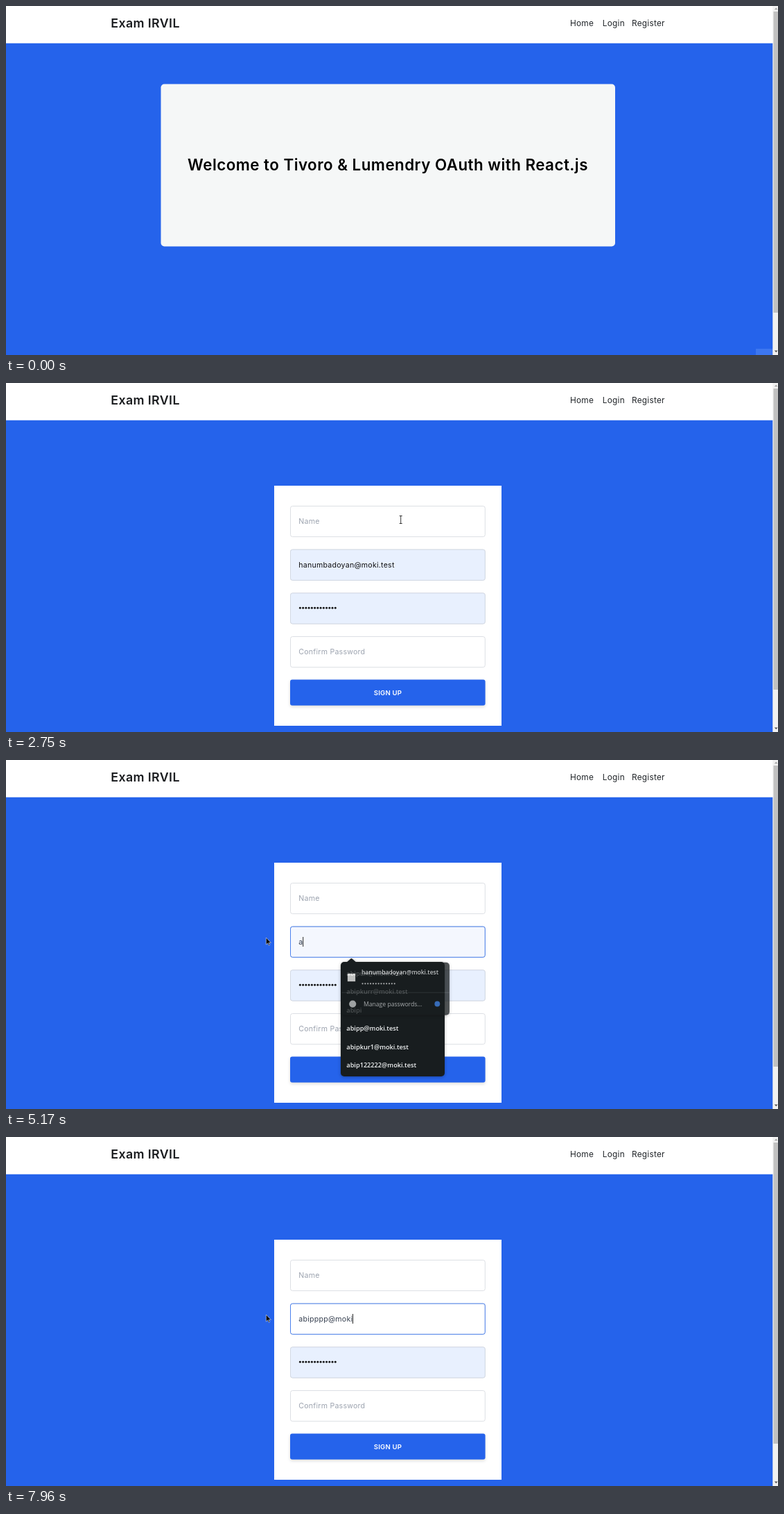
An HTML page for the animation above (8 s loop, 1114 by 503 pixels).

```html
<!DOCTYPE html>
<html lang="en">
<head>
<meta charset="utf-8">
<title>Sign up form</title>
<style>
html, body { margin: 0; width: 100%; height: 100%; overflow: hidden; }
svg { display: block; width: 1114px; height: 503px; }
text { font-family: Inter, "Open Sans", sans-serif; letter-spacing: .022em; white-space: pre; }
.nav { font-size: 11.8px; fill: #212529; }
.logo { font-size: 17.8px; font-weight: 600; fill: #1b1d20; }
.title { font-size: 22.3px; font-weight: 600; text-anchor: middle; }
.hint { font-size: 10.6px; fill: #9ca3af; }
.value { font-size: 10.6px; fill: #374151; }
.button { font-size: 9.6px; font-weight: 600; fill: #fff; text-anchor: middle; }
.menu text, .status text { font-family: "Open Sans", "Noto Sans", sans-serif; letter-spacing: 0; }
.menu { filter: drop-shadow(0 1px 2px rgba(0, 0, 0, .3)); transform-box: fill-box; transform-origin: center; }
.menu text { font-size: 9.2px; font-weight: 600; fill: #f1f3f4; }
.menu text.saved { font-size: 8.7px; }
.menu text.plain { font-size: 8.8px; font-weight: 400; fill: #d5d8da; }
.status text { font-size: 8.4px; fill: #eceef0; }
.box { fill: #fff; stroke: #dcdfe4; }
.shadow { filter: drop-shadow(0 2px 2px rgba(0, 0, 0, .14)); }
</style>
</head>
<body>
<svg viewBox="0 0 1114 503">
  <rect width="1114" height="503" fill="#2563eb"/>
  <rect width="1114" height="53.7" fill="#fff"/>
  <text class="logo" x="151.3" y="30.5">Exam IRVIL</text>
  <text class="nav" x="814" y="28.7">Home</text>
  <text class="nav" x="860.8" y="28.7">Login</text>
  <text class="nav" x="903" y="28.7">Register</text>

  <g id="home">
    <rect x="223.5" y="112.5" width="655.5" height="234" rx="5" fill="#f5f7f7"/>
    <text class="title" x="551" y="237">Welcome to Tivoro &amp; Lumendry OAuth with React.js</text>
  </g>

  <g id="form">
    <rect x="387" y="148" width="328" height="346" fill="#fff"/>
    <g id="fields"></g>
    <rect class="shadow" x="410" y="427.6" width="281.6" height="37.2" rx="3" fill="#2563eb"/>
    <text class="button" x="551" y="449.8">SIGN UP</text>
    <rect id="mark" y="254.5" height="15" fill="#2459c9"/>
    <text class="value" x="422.3" y="265.5"><tspan id="plain"></tspan><tspan id="picked" fill="#fff"></tspan></text>
    <rect id="caret" y="255" width=".9" height="14" fill="#111"/>
  </g>
  <g id="menus"></g>

  <rect id="corner" x="1082" y="494" width="25" height="9" fill="#3d77f0"/>
  <g id="status" class="status">
    <path d="M0 488H90Q93 488 93 491V503H0Z" fill="#2a3136"/>
    <text x="-3" y="499">localhost:3000/register</text>
  </g>
  <rect x="1106.3" width="8" height="503" fill="#f1f1f1"/>
  <rect x="1107.5" y="8" width="6.5" height="434" fill="#c1c1c1"/>
  <path d="M1108.8 5.2L1111.3 2.4 1113.6 5.2Z" fill="#a3a3a3"/>
  <path d="M1108.8 496.4L1111.3 499.2 1113.6 496.4Z" fill="#505050"/>

  <g id="cursor">
    <circle id="halo" r="9" fill="#ffe14a"/>
    <path id="arrow" d="M0 0V10L2.4 7.9 4 11.3 5.4 10.6 3.9 7.4H7.1Z" fill="#0b0b0b" stroke="#fff" stroke-width=".5"/>
    <path id="hand" d="M-1 .8C-1-.4 .8-.4 .8 .8V4.6L4 5.2C5 5.4 5.2 6 5 7L4.2 10.5V12H-.8V10.8L-3.8 7.4C-4.2 6.4-3 5.8-2.2 6.6L-1 7.6Z" fill="#fff" stroke="#111" stroke-width=".8"/>
    <path id="beam" d="M-2-5.5H2M0-5.5V5.5M-2 5.5H2" fill="none" stroke="#222" stroke-width=".9"/>
  </g>
</svg>
<script>
const LOOP = 8000;
const OPEN = 1650, AUTOFILL = 1780, FOCUS = 3400, DRAG = 3560, TYPE = 5170, NARROW = 5970;
const MAIL = "@moki.test";
const SAVED = "hanumbadoyan" + MAIL;
const TYPED = "abipppp@moki";

const $ = id => document.getElementById(id);
const clamp = v => Math.min(1, Math.max(0, v));
const show = (id, on) => { $(id).style.display = on ? "" : "none"; };
const fade = (id, value) => {
  $(id).style.opacity = value;
  show(id, value > 0);
};

// 1 between two times, with a ramp after each of them.
const span = (t, on, off, rise = 1, fall = 130) =>
  t < on ? 0 : Math.min(clamp((t - on + 1) / rise), 1 - clamp((t - off) / fall));

const dots = (x, y, gap, r, fill) => Array.from({ length: 13 }, (_, i) =>
  `<circle cx="${x + i * gap}" cy="${y}" r="${r}" fill="${fill}"/>`).join("");

$("fields").innerHTML = ["Name", "Email address", "Password", "Confirm Password"].map((label, i) => {
  const y = 177.4 + i * 62.7;
  const frame = `x="410.5" y="${y}" width="280.8" height="44.2" rx="3"`;
  return `<rect class="box" ${frame}/>
    <rect id="tint${i}" ${frame} fill="#e8f0fe" stroke="#d3d9e4" style="display:none"/>
    <text class="hint" id="hint${i}" x="422.3" y="${y + 25.4}">${label}</text>
    <rect id="focus${i}" ${frame} fill="none" stroke="#4a80ee" style="display:none"/>`;
}).join("") + `<g id="secret">${dots(424.4, 324.2, 4.24, 1.45, "#111")}</g>`;

const menu = (id, width, height, body) => `<g class="menu" id="${id}">
  <path d="M491 292L498.3 285.8 505.6 292Z" fill="#181d1f"/>
  <rect x="483" y="291" width="${width}" height="${height}" rx="5" fill="#181d1f"/>${body}</g>`;
const lines = names => names.map((name, i) =>
  `<text x="491.3" y="${311 + i * 26.4}">${name}</text>`).join("");

$("menus").innerHTML =
  menu("single", 123, 33, lines(["abipp" + MAIL])) +
  menu("list", 150, 165, lines(["abipun" + MAIL, "abipkurr" + MAIL, "abipi",
    "abipp" + MAIL, "abipkur1" + MAIL, "abip122222" + MAIL])) +
  menu("manager", 158.5, 77.5, `
    <rect x="491.5" y="307.5" width="11.5" height="11.5" fill="#f4f4f2"/>
    <text class="saved" x="512" y="308.8">${SAVED}</text>
    ${dots(513.6, 322.2, 3.92, 1.15, "#d8dadb")}
    <path d="M483 335.3H641.5" stroke="#40474a" stroke-width=".8"/>
    <circle cx="499" cy="352" r="5.2" fill="#c9cccd"/>
    <text class="plain" x="515" y="355.5">Manage passwords...</text>
    <circle cx="623.5" cy="352" r="4" fill="#4285e8"/>`);

// Mouse strokes: each is a curve from the last resting place.
const STROKES = [
  { at: 90, ms: 610, via: [960, 130], to: [926, 25] },
  { at: 1850, ms: 490, via: [880, 150], to: [642, 190] },
  { at: 2410, ms: 270, via: [590, 197], to: [569.7, 197] },
  { at: 3080, ms: 270, via: [568, 240], to: [562, 262] },
  { at: DRAG, ms: 280, via: [479, 268], to: [396, 257.5] },
  { at: 3900, ms: 70, via: [385, 257], to: [375.3, 256] }
];

function mouse(t) {
  let pos = [1104, 478];
  for (const { at, ms, via, to } of STROKES) {
    const k = clamp((t - at) / ms), m = 1 - k;
    pos = pos.map((p, i) => m * m * p + 2 * m * k * via[i] + k * k * to[i]);
  }
  return pos;
}

// Letters come in bursts of evenly spaced key presses.
const burst = (t, at, count, gap) =>
  Math.min(count, Math.max(0, Math.floor((t - at) / gap) + 1));
const letters = t => burst(t, TYPE, 4, 90) + burst(t, NARROW, 3, 200) +
  burst(t, 7100, 1, 90) + burst(t, 7630, 4, 110);

function drawForm(t) {
  const filled = t >= AUTOFILL, typing = t >= TYPE;
  const text = typing ? TYPED.slice(0, letters(t)) : filled ? SAVED : "";
  const drag = clamp((t - DRAG) / 297);
  const cut = typing ? text.length : Math.round(SAVED.length * (1 - drag * drag));
  $("plain").textContent = text.slice(0, cut);
  $("picked").textContent = text.slice(cut);
  $("plain").setAttribute("fill", typing ? "#374151" : "#111");
  show("hint1", !filled);
  show("hint2", !filled);
  show("secret", filled);
  show("tint2", filled);
  fade("tint1", span(t, AUTOFILL, TYPE - 20, 1, 40));
  show("focus1", t >= FOCUS);

  const end = 422.3 + (cut ? $("plain").getComputedTextLength() : 0);
  const picked = cut < text.length;
  show("mark", picked);
  if (picked) {
    $("mark").setAttribute("x", end);
    $("mark").setAttribute("width", $("picked").getComputedTextLength());
  }
  show("caret", typing && !(t >= 6840 && t < 7100));
  $("caret").setAttribute("x", end - .2);
}

function drawCursor(t) {
  const [x, y] = mouse(t);
  show("cursor", t >= 90);
  $("cursor").setAttribute("transform", `translate(${x} ${y})`);
  const hand = y < 33 && x > 903;
  const field = t >= OPEN && x > 410 && x < 692 && y > 177 && (y - 177) % 62.7 < 45;
  show("hand", hand);
  show("beam", field);
  show("arrow", !hand && !field);
  fade("halo", .8 * Math.max(span(t, 1580, 1640, 1, 60), span(t, FOCUS, 4170)));
}

function drawMenu(id, value) {
  fade(id, value);
  $(id).style.transform = `scale(${.92 + .08 * value})`;
}

function draw(t) {
  show("home", t < OPEN);
  show("form", t >= OPEN);
  if (t >= OPEN) drawForm(t);
  drawCursor(t);
  fade("corner", span(t, 0, 90));
  fade("status", span(t, 880, 2340, 100));
  drawMenu("manager", span(t, FOCUS + 30, TYPE - 30, 70));
  drawMenu("list", span(t, TYPE, NARROW - 30, 1, 100));
  drawMenu("single", span(t, NARROW, NARROW + 200));
}

const start = performance.now();
function tick() {
  draw((performance.now() - start) % LOOP);
  requestAnimationFrame(tick);
}
tick();
</script>
</body>
</html>
```
